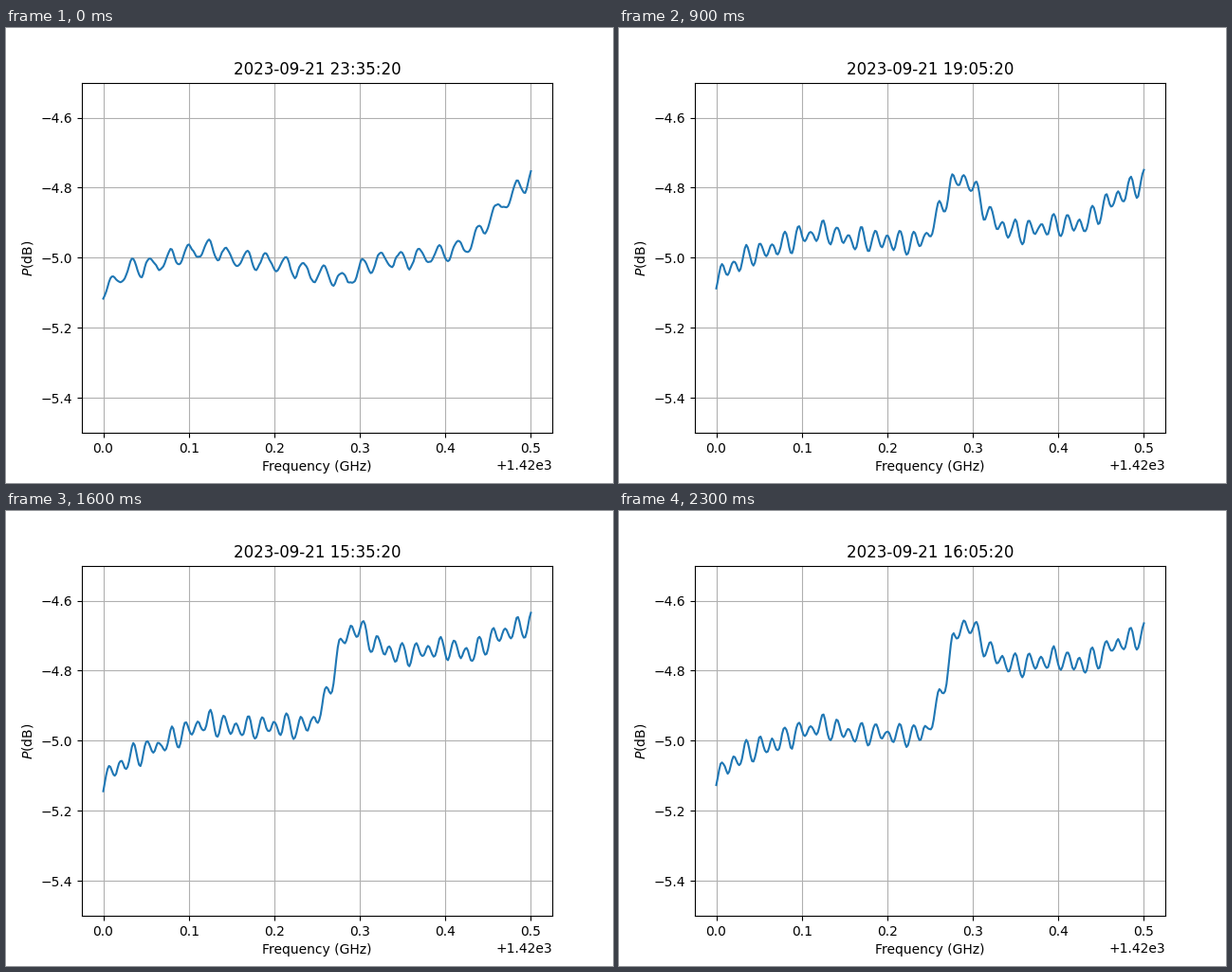
A matplotlib script that plays this animation: 640 by 480 pixels, repeating every 2400 ms.

```python
import numpy as np
import matplotlib.pyplot as plt
from matplotlib.animation import FuncAnimation

W, H, DPI = 640, 480, 100
F0, BAND = 1420, 0.5
FAST, SLOW = 0.01497, 0.02245    # ripple periods

# Band shape at 21:05 as (frequency offset, dB)
SHAPE = [(0, -5.14), (0.035, -5.064), (0.066, -5.037), (0.095, -4.996),
         (0.124, -4.969), (0.155, -4.985), (0.2, -4.977), (0.245, -4.98),
         (0.275, -4.925), (0.3, -4.9), (0.35, -4.922), (0.4, -4.9),
         (0.43, -4.89), (0.456, -4.82), (0.5, -4.735)]

# Hour: change in mdB at left, knee, plateau, right; bump; fast and slow ripple
KEYS = {
    15.0: (11, 49, 197, 100, 25, 24, 12),
    16.0: (40, -14, 135, 40, 115, 24, 12),
    18.5: (95, 30, 22, -40, 165, 24, 12),
    19.5: (62, -5, -32, -49, 120, 24, 12),
    20.0: (-27, 0, 0, 0, 40, 24, 12),
    21.0: (0, 0, 0, 0, 0, 24, 12),
    21.5: (68, -5, -46, -51, 0, 24, 12),
    23.5: (50, -60, -85, -32, -65, 4, 23),
}

# Record shown in each 100 ms step; x.0 is five past, x.5 is 35 past
HOURS = [23.5, 23.5, 23, 21.5, 22.5, 22, 20.5, 21, 20, 19, 18, 19.5,
         17.5, 17, 18.5, 16.5, 15.5, 14.5, 14, 15, 13.5, 13, 12.5, 16]

u = np.linspace(0, BAND, 300)
shape = np.interp(u, *zip(*SHAPE))


def wave(period, peak):
    return np.cos(2 * np.pi * (u - peak) / period)


def grain(seed):
    noise = np.random.default_rng(seed).normal(0, 4, len(u))
    return np.convolve(noise, [0.25, 0.5, 0.25], "same")


def power(hour):
    """Spectrum in dB: band shape, drift, hydrogen bump, ripple and grain."""
    left, knee, plateau, right, bump, fast, slow = (
        np.interp(hour, list(KEYS), col) for col in zip(*KEYS.values()))
    low = np.interp(u, [0, 0.25], [left, knee])
    high = np.interp(u, [0.4, BAND], [plateau, right])
    step = 1 / (1 + np.exp(-(u - 0.272) / 0.006))
    drift = low + (high - low) * step
    line = bump * np.exp(-((u - 0.285) / 0.021) ** 2 / 2)
    ripple = fast * wave(FAST, 0.00565) + slow * wave(SLOW, 0.0554)
    return shape + (drift + line + ripple + grain(int(2 * hour))) / 1000


def stamp(hour):
    return f"2023-09-21 {int(hour):02d}:{'35' if hour % 1 else '05'}:20"


fig, ax = plt.subplots(figsize=(W / DPI, H / DPI), dpi=DPI)
trace, = ax.plot(F0 + u, power(HOURS[0]))
title = ax.set_title(stamp(HOURS[0]))
ax.set_xlim(F0 - 0.025, F0 + 0.525)
ax.set_ylim(-5.5, -4.5)
ax.set_xlabel("Frequency (GHz)")
ax.set_ylabel("$P$(dB)")
ax.grid(True)


def update(i):
    trace.set_ydata(power(HOURS[i]))
    title.set_text(stamp(HOURS[i]))
    return trace, title


anim = FuncAnimation(fig, update, frames=len(HOURS), interval=100,
                     repeat=True, repeat_delay=0, blit=False)
plt.show()
```
